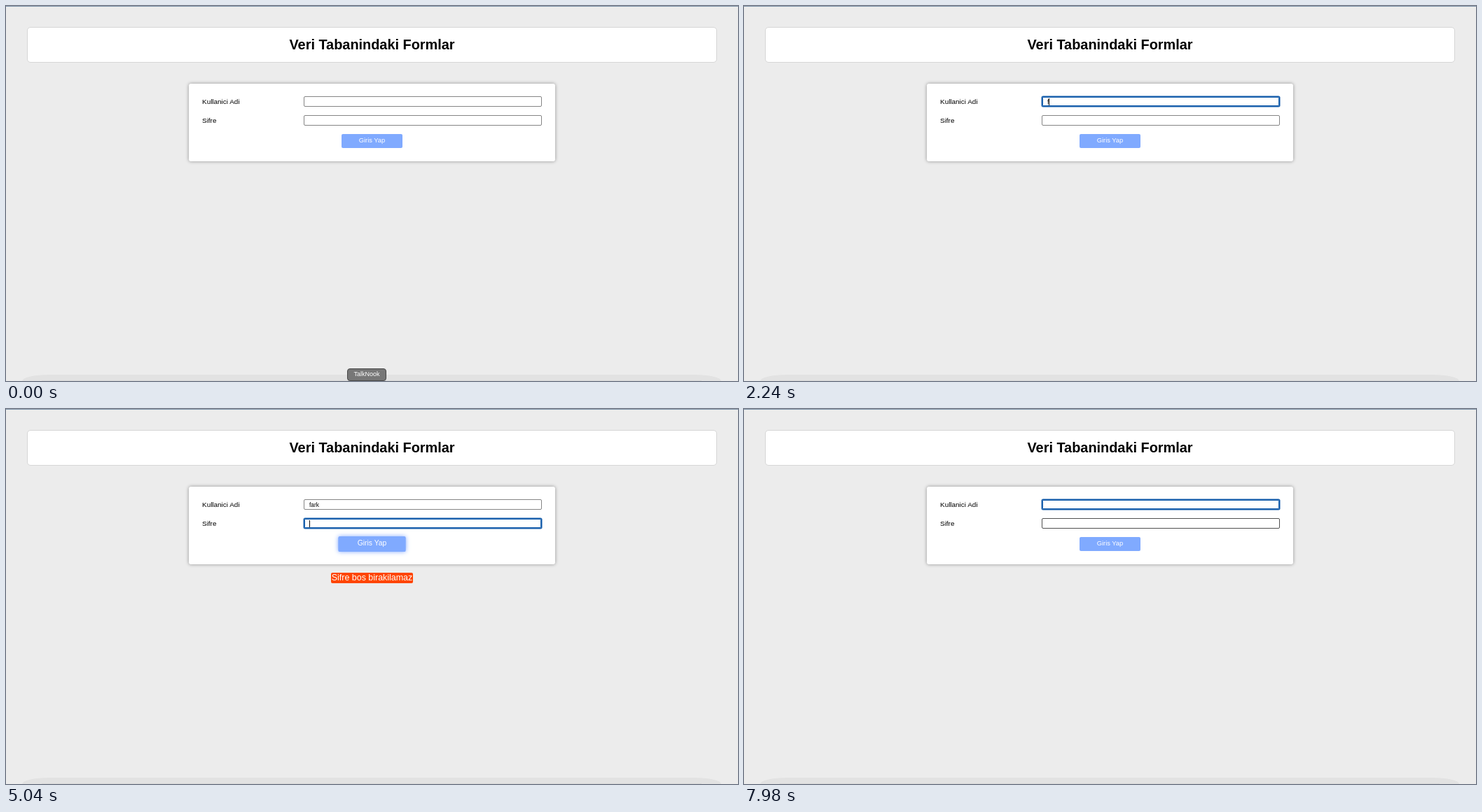
Recreate the animation shown at these times as an HTML page. Size 1045 by 536 pixels, loop 8 s.

```html
<!DOCTYPE html>
<html lang="tr">
<head>
<meta charset="utf-8">
<title>Form</title>
<style>
html, body { margin: 0; width: 100%; height: 100%; overflow: hidden; background: #ececec; }
body { position: relative; font: 9.95px/12px "Liberation Sans", Arial, sans-serif; color: #000; }
body *, #card { box-sizing: border-box; white-space: pre; }
body > * { position: absolute; }
#top { left: 0; top: 0; width: 1045px; height: 1px; background: #7f95ab; }
h1 { left: 30px; top: 30px; width: 985px; height: 51px; margin: 0; border: 1.5px solid #d6d6d6; border-radius: 5px;
  background: #fff; font-size: 19.9px; line-height: 48px; text-align: center; }
#card { left: 261px; top: 110.5px; width: 523px; height: 111px; border-radius: 3px; background: #fff; box-shadow: 0 0 5px rgba(0,0,0,.4); }
.label { left: 280px; }
.field { left: 425px; width: 340px; height: 15px; border: 1px solid #858585; border-radius: 2px; background: #fff;
  font-size: 8.3px; line-height: 10px; }
.field.hover { border-color: #505050; }
.field.focus { border-color: #1b61ad; box-shadow: 0 0 0 .5px #1b61ad, inset 0 0 0 1px #1b61ad; }
.field span { position: absolute; left: 7px; top: 2px; height: 10px; }
.field .sel { background: #b3d7ff; }
.field i { position: absolute; left: 100%; top: 0; width: 1px; height: 10px; background: #111; }
#button { left: 479px; top: 183.3px; width: 87px; height: 19.7px; border-radius: 2px; background: #80aaff; color: #fff;
  font-size: 9.33px; line-height: 19.7px; text-align: center; }
#message { left: 464.3px; top: 234px; width: 116.4px; height: 15px; border-radius: 2px; background: #ff4500; color: #fff;
  font-size: 12.44px; line-height: 15px; text-align: center; }
#popup { left: 487px; top: 151px; width: 96px; height: 136px; padding: 3px 0; border-radius: 4px; background: #fff;
  box-shadow: 0 1px 3px rgba(0,0,0,.35); font-size: 8px; line-height: 21.7px; text-indent: 10px; }
#popup::before { content: ""; position: absolute; left: 8px; top: -4px; border: 4px solid transparent; border-top: 0; border-bottom-color: #fff; }
#dock { left: 23px; top: 527px; width: 998px; height: 9px; border-radius: 38px 38px 0 0 / 9px 9px 0 0; background: #e2e2e2; }
#dock::after { content: ""; position: absolute; left: 28px; right: 28px; bottom: 0; height: 1px; background: #d8d8d8; }
#tip { left: 487px; top: 518px; width: 56px; height: 17.5px; border: 1px solid #484848; border-radius: 4px; background: #777;
  color: #fff; font-size: 9px; line-height: 15.5px; text-align: center; }
#hand { left: 522px; top: 194px; }
</style>
</head>
<body>
<div id="top"></div>
<h1>Veri Tabanindaki Formlar</h1>
<div id="card"></div>
<div class="label" style="top:131px">Kullanici Adi</div>
<div class="label" style="top:158px">Sifre</div>
<div class="field" id="user" style="top:129px"><span><b style="font-weight:400"></b><i></i></span></div>
<div class="field" id="pass" style="top:156px"><span><i></i></span></div>
<div id="button">Giris Yap</div>
<div id="message">Sifre bos birakilamaz</div>
<div id="popup">deneme
yeni
ornek
kayit
form
liste</div>
<div id="dock"></div>
<div id="tip">TalkNook</div>
<svg id="hand" width="11" height="12"><path d="M3.5 7V1.5q1-1 2 0V5l4 1v3l-1 2.5h-4L1 7.5q1-1.5 2.500-.5z" fill="#fff" stroke="#222" stroke-width=".8"/></svg>
<script>
const $ = id => document.getElementById(id);
const LOOP = 8000, STEP = 70;

// Each track lists [start time, value]
const typed = [[0, ''], [2240, 'f'], [2310, 'fa'], [2730, 'fak'], [3710, 'fa'], [3780, 'far'], [3920, 'fark'], [7140, '']];
const focus = [[0, ''], [1540, 'user'], [4900, ''], [5040, 'pass'], [6300, 'user']];
const hover = [[0, ''], [1260, 'user'], [2590, 'pass'], [2800, ''], [5950, 'pass'], [6090, 'user'], [7980, 'pass']];
const caret = [[0, 0], [1540, 1], [2030, 0], [2240, 1], [3220, 0], [3710, 1], [4480, 0], [5040, 1],
  [5530, 0], [6020, 1], [6510, 0], [7140, 1], [7700, 0]];

const at = (track, t) => track.filter(k => k[0] <= t).pop()[1];
const show = (el, on) => { el.style.visibility = on ? 'visible' : 'hidden'; };
const ease = (t, start) => {
  const p = Math.min(1, Math.max(0, (t - start) / 300));
  return 1 - (1 - p) ** 2.3;
};

function draw(t) {
  const text = $('user').querySelector('b');
  text.textContent = at(typed, t);
  text.className = t >= 6510 && t < 7140 ? 'sel' : '';

  for (const id of ['user', 'pass']) {
    const field = $(id), focused = at(focus, t) === id;
    field.classList.toggle('focus', focused);
    field.classList.toggle('hover', at(hover, t) === id);
    show(field.querySelector('i'), focused && at(caret, t));
  }

  const grow = ease(t, 2780) - ease(t, 5850);
  $('button').style.transform = `scale(${1 + .108 * grow})`;
  $('button').style.boxShadow = `0 0 6px rgba(110,155,255,${.85 * grow})`;

  show($('popup'), t >= 1540 && t < 2240);
  show($('hand'), t >= 4620 && t < 4690);
  show($('message'), t >= 5040 && t < 7210);
  $('tip').style.opacity = Math.max(0, 1 - t / 210);
}

const start = performance.now();
function tick() {
  const t = (performance.now() - start) % LOOP;
  draw(Math.floor(t / STEP) * STEP);
  requestAnimationFrame(tick);
}
tick();
</script>
</body>
</html>
```
